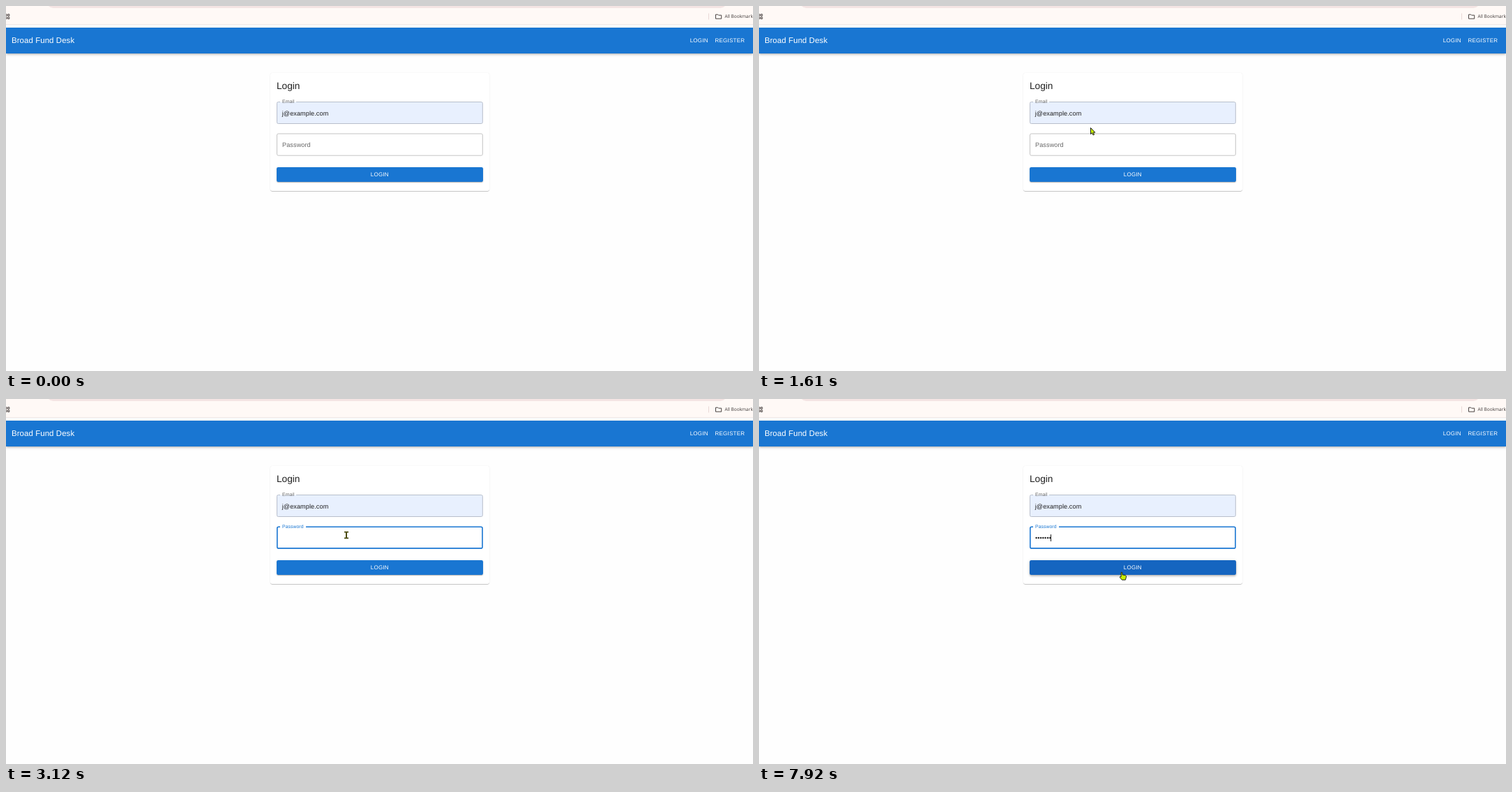
An HTML page for the animation above (8000 ms loop, 1071x523 px).

```html
<!DOCTYPE html>
<html lang="en">
<head>
<meta charset="utf-8">
<title>Login form</title>
<style>
  html, body { margin: 0; width: 100%; height: 100%; overflow: hidden; background: #fefefe; }
  div, svg { position: absolute; left: 0; top: 0; }
  svg { width: 1071px; height: 523px; }
  #chrome { width: 1071px; height: 26px; background: #fff9f6; border-bottom: 1px solid #f0e7e5; overflow: hidden; }
  #pill { left: 58px; top: -17px; width: 976px; height: 20px; border-radius: 10px; background: #f4e4e3; }
  #bar { top: 31px; width: 1071px; height: 36.7px; background: #1976d2;
    box-shadow: 0 1.1px 2.3px -.6px #0003, 0 2.3px 2.9px #00000024, 0 .6px 5.7px #0000001f; }
  #card { left: 378.6px; top: 96px; width: 314px; height: 169.3px; border-radius: 2.3px; background: #fff;
    box-shadow: 0 1.1px .6px -.6px #0003, 0 .6px .6px #00000024, 0 .6px 1.7px #0000001f; }
  #button { left: 388px; top: 231px; width: 295.6px; height: 20.8px; border-radius: 2.3px; }
  text { font-family: "Liberation Sans", Arial, sans-serif; font-size: 9.14px; letter-spacing: .086px;
    fill: #212121; text-rendering: geometricPrecision; }
  .caps { font-size: 8px; letter-spacing: .229px; fill: #fff; }
  .edge { fill: none; }
  .pointer { fill: #c6ee00; stroke: #222; stroke-width: 1; stroke-linejoin: round; }
</style>
</head>
<body>
<div id="chrome"><div id="pill"></div></div>
<div id="bar"></div>
<div id="card"></div>
<div id="button"></div>
<svg viewBox="0 0 1071 523">
  <g fill="none" stroke="#4a4443" stroke-width="1">
    <path d="M-1 11.8H.9V14.2H-1M-1 16H.9V18.4H-1M2.5 11.8H4.8V14.2H2.5ZM2.5 16H4.8V18.4H2.5Z"/>
    <path d="M1017.5 12.2H1020.6L1021.6 13.2H1025.7V18.2H1017.5Z"/>
    <path d="M1007.5 10.5V19.5" stroke="#ead9d7"/>
  </g>
  <text x="1030.5" y="17.3" style="font:6.5px 'Open Sans',sans-serif;letter-spacing:0;fill:#3c3736">All Bookmarks</text>

  <text x="8" y="53.4" style="font-size:11.43px;fill:#fff">Broad Fund Desk</text>
  <text class="caps" x="980.7" y="52.4">LOGIN</text>
  <text class="caps" x="1016.5" y="52.4">REGISTER</text>

  <text x="387.9" y="119" style="font-size:13.71px;letter-spacing:0">Login</text>

  <rect x="388.3" y="137.5" width="295.2" height="31.1" rx="2.3" fill="#e8f0fe"/>
  <path id="emailEdge" class="edge"/>
  <text x="396" y="139.4" style="font-size:6.86px;letter-spacing:.065px;fill:#666">Email</text>
  <text x="395.7" y="156.6">j@example.com</text>

  <path id="passEdge" class="edge"/>
  <text id="label">Password</text>
  <text id="dots" x="396" y="201.7"></text>
  <rect id="caret" y="194" width="1" height="10" fill="#222"/>

  <text class="caps" x="522.8" y="243.7">LOGIN</text>

  <circle id="glow" r="8.2" fill="#ff0"/>
  <path id="beam" fill="#4b4b12" d="M-3-5.3H3V-3.6H1V3.6H3V5.3H-3V3.6H-1V-3.6H-3Z"/>
  <path id="arrow" class="pointer" d="M.5.5V9.6L2.5 7.8 4.1 11 5.6 10.3 4.2 7.2H6.9Z"/>
  <path id="hand" class="pointer" d="M-.9 1.2Q0-.4.9 1.2V4.2L5.3 5Q6.9 5.5 6.5 7.6L5.4 11.6H.4L-2.7 7.9Q-2.7 6.2-.9 7.2Z"/>
</svg>
<script>
const LOOP = 8000, FOCUS = 2570, BLINK = 530;
const GREY = [102, 102, 102], BLUE = [25, 118, 210], DEEP = [21, 101, 192];

// Pointer steps: time, x, y
const moves = [
  [0, 1000, 560],
  [570, 982, 512], [640, 930, 470], [710, 845, 412], [780, 745, 352], [850, 650, 298],
  [910, 580, 256], [980, 525, 222], [1050, 490, 199], [1120, 473, 189], [1190, 472, 189],
  [1380, 472, 187], [1450, 472, 184], [1520, 473, 179], [1600, 475, 174], [1680, 476, 170],
  [1750, 478, 169], [1830, 480, 171], [1910, 481, 174], [1980, 482, 178], [2060, 483, 180.5],
  [2130, 484, 190], [2190, 486, 191], [2260, 487, 192], [2520, 487, 192.3], [2600, 487, 192.3],
  [2660, 487, 193], [2730, 488, 194], [2800, 488, 195], [2860, 488, 195],
  [7510, 489, 198], [7580, 494, 213], [7650, 503, 232], [7720, 510, 241], [7780, 515, 245],
  [7850, 518, 247], [7920, 520, 247.6]
];
const keys = [3920, 4050, 4180, 4650, 5530, 6340, 6580];

const $ = id => document.getElementById(id);
const clamp = v => Math.max(0, Math.min(1, v));
const mix = (a, b, p) => `rgb(${a.map((v, i) => Math.round(v + (b[i] - v) * p))})`;
const show = (id, on) => $(id).style.display = on ? '' : 'none';

// Rounded outline with a gap in its top side for the label
function edge(id, top, height, gap, width, color) {
  const l = 388 + width / 2, r = 683.8 - width / 2, t = top + width / 2, b = top + height - width / 2, c = 2;
  const corner = (x, y) => `a${c} ${c} 0 0 1 ${x} ${y}`;
  $(id).setAttribute('d', `M${393 + gap} ${t}H${r - c}${corner(c, c)}V${b - c}${corner(-c, c)}H${l + c}` +
    `${corner(-c, -c)}V${t + c}${corner(c, -c)}H393`);
  $(id).setAttribute('stroke', color);
  $(id).setAttribute('stroke-width', width);
}

function render(time) {
  const [t, x, y] = moves.findLast(m => m[0] <= time);
  const inside = x > 388 && x < 684;
  const onField = inside && y > 182.6 && y < 215;
  const onButton = inside && y > 231 && y < 251.8;
  const focused = t >= FOCUS;

  // Password field
  const p = focused ? 1 - (1 - clamp((t - FOCUS) / 200)) ** 3 : 0;
  const gap = 37 * clamp((t - FOCUS - 50) / 100);
  if (focused) edge('passEdge', 182.5, 32.2, gap, 1.6, '#1976d2');
  else edge('passEdge', 182.5, 32.2, 0, 1, onField ? '#212121' : '#c4c4c4');
  $('label').setAttribute('transform', `translate(396 ${201.6 - 16.6 * p}) scale(${1 - p / 4})`);
  $('label').style.fill = mix(GREY, BLUE, p);

  // Typing and caret
  const typed = keys.filter(k => k <= time);
  const since = time - (typed.at(-1) ?? 2590);
  $('dots').textContent = '•'.repeat(typed.length);
  $('caret').setAttribute('x', Math.floor(396.3 + 3.2 * typed.length));
  show('caret', focused && Math.floor(since / BLINK) % 2 === 0);

  // Button
  const h = onButton ? clamp((t - 7620) / 250) : 0;
  const px = (a, b) => (a + (b - a) * h) + 'px ';
  $('button').style.background = mix(BLUE, DEEP, h);
  $('button').style.boxShadow = `0 ${px(1.7, 1.1)}${px(.6, 2.3)}${px(-1.1, -.6)}#0003,` +
    `0 ${px(1.1, 2.3)}${px(1.1, 2.9)}#00000024, 0 .6px ${px(2.9, 5.7)}#0000001f`;

  // Pointer and click highlight
  const glow = t >= 2600 ? clamp((2860 - t) / 200) : 0;
  const kind = onField ? 'beam' : onButton ? 'hand' : 'arrow';
  for (const id of ['beam', 'arrow', 'hand']) show(id, id === kind);
  for (const id of [kind, 'glow']) $(id).setAttribute('transform', `translate(${x} ${y})`);
  $('glow').style.opacity = .68 * glow;
  $('beam').style.opacity = 1 - .4 * glow;
}

edge('emailEdge', 137, 32, 23, 1, '#b8bfcb');
const start = performance.now();
function tick() {
  render((performance.now() - start) % LOOP);
  requestAnimationFrame(tick);
}
tick();
</script>
</body>
</html>
```
